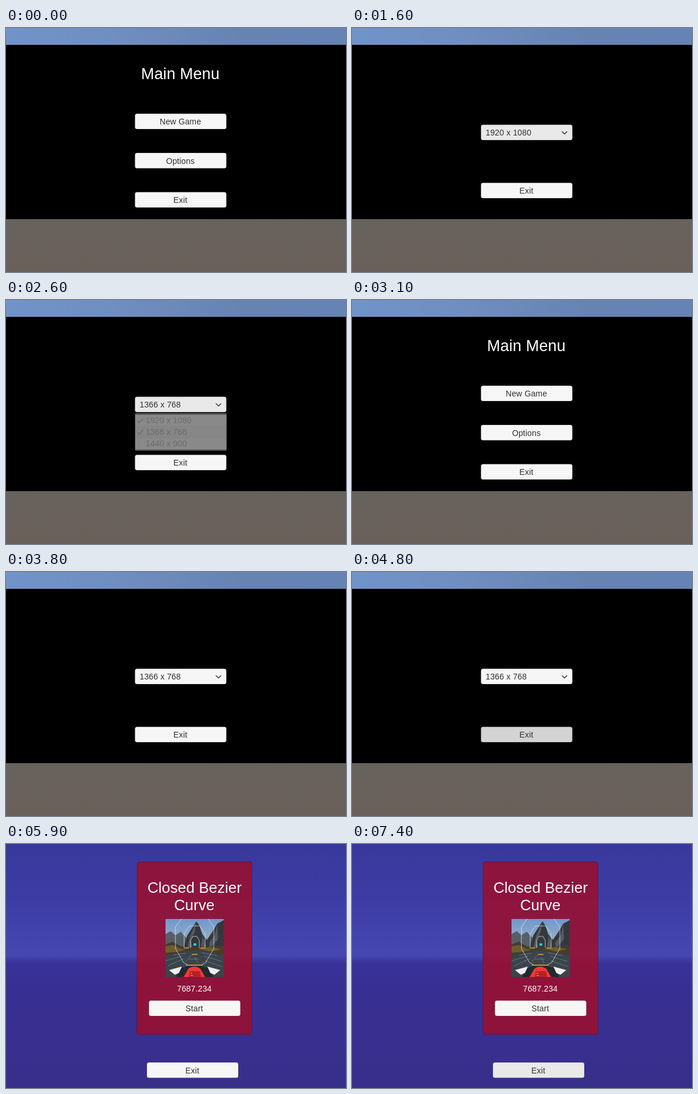
An HTML page that plays this animation: 584 by 420 pixels, repeating every 8000 ms.

```html
<!DOCTYPE html>
<html lang="en">
<head>
<meta charset="utf-8">
<title>Menu</title>
<style>
html, body { margin: 0; width: 100%; height: 100%; overflow: hidden; background: #000; }
svg { display: block; }
text { font: 14px "Liberation Sans", Arial, sans-serif; letter-spacing: .14px; fill: #323232; }
.mid { text-anchor: middle; }
.white { fill: #fff; }
.line { fill: none; stroke: #323232; stroke-width: 1.3; }
.button rect { stroke: #000; stroke-opacity: .13; }
#list > * { opacity: var(--a); }
</style>
</head>
<body>
<svg width="584" height="420" viewBox="0 0 584 420">
  <defs>
    <linearGradient id="sky">
      <stop offset="0" stop-color="#7093ca"/><stop offset=".3" stop-color="#708fc1"/>
      <stop offset=".7" stop-color="#6683b1"/><stop offset="1" stop-color="#6583b5"/>
    </linearGradient>
    <linearGradient id="ground" x2="0" y2="1">
      <stop offset="0" stop-color="#67625e"/><stop offset="1" stop-color="#6a605a"/>
    </linearGradient>
    <linearGradient id="dusk" x2="0" y2="1">
      <stop offset="0" stop-color="#38389c"/><stop offset=".22" stop-color="#3d3ca4"/>
      <stop offset=".4" stop-color="#4344ae"/><stop offset=".455" stop-color="#4647b0"/>
      <stop offset=".49" stop-color="#383298"/><stop offset=".6" stop-color="#382f93"/>
      <stop offset="1" stop-color="#382f8b"/>
    </linearGradient>
    <linearGradient id="air" x2="0" y2="1">
      <stop offset="0" stop-color="#6f98cd"/><stop offset=".5" stop-color="#a4b5c4"/>
    </linearGradient>
    <clipPath id="photo"><path d="M274 129h100v100h-100z"/></clipPath>
  </defs>

  <g id="menus">
    <path fill="url(#sky)" d="M0 0h584v29H0z"/>
    <path fill="url(#ground)" d="M0 329h584v91H0z"/>
    <g id="main">
      <text class="mid white" x="299.5" y="87.5" style="font-size:27px">Main Menu</text>
    </g>
    <g id="options">
      <g class="button">
        <rect id="drop" x="221.5" y="166.5" width="157" height="26.5" rx="3.5"/>
        <text id="value" x="229.5" y="185"></text>
        <path class="line" d="M360.5 178l4.5 4.5 4.5-4.5"/>
      </g>
      <g id="list">
        <rect x="221.5" y="194.5" width="157.5" height="65" rx="2" fill="#fff"/>
      </g>
    </g>
  </g>

  <g id="level">
    <path fill="url(#dusk)" d="M0 0h584v420H0z"/>
    <rect x="225" y="30.5" width="197.5" height="297.5" rx="4" fill="#9b0f2d" fill-opacity=".86" stroke="#4a1a50" stroke-opacity=".7"/>
    <g class="mid">
      <text class="white" x="324" y="84" style="font-size:26px;letter-spacing:0">Closed Bezier</text>
      <text class="white" x="323.5" y="114" style="font-size:26px;letter-spacing:0">Curve</text>
      <text class="white" x="323.5" y="254">7687.234</text>
    </g>
    <g clip-path="url(#photo)">
      <path fill="url(#air)" d="M274 129h100v100h-100z"/>
      <path fill="#565f68" d="M274 155l9-5 8 7 9-6 12 13 20 8 42-20v34H274z"/>
      <path fill="#33383c" d="M304 182l7-24 9-14 7-11 5 7 5 15 8 10 9-13 9-15 11-6v55H304z"/>
      <path fill="#555b60" d="M327 134l-3 18-7 13 3 12-9 4 5-22zM363 139l-5 19-9 12 1 11 14-17zM338 157l6 21-9 3z"/>
      <path fill="#443d2c" d="M274 173l12-5 14 8 18 3 56-4v54H274z"/>
      <path fill="#6d5c2e" d="M274 176l13-2 12 6 9 2-16 4-18 1zM330 181l20-4 20 4-18 4z"/>
      <path fill="#3a444c" d="M274 193l40-9h20l40 8v37H274z"/>
      <path fill="none" stroke="#78858e" stroke-opacity=".75" d="M274 201l28-8M278 210l28-13M287 191l22-3M308 203l10-11M314 198h17M330 205l-6-10M340 193l30 9M342 201l29 10M336 187l26 5"/>
      <path fill="none" stroke="#dce6ec" stroke-width=".9" stroke-opacity=".85" d="M301 129l-10 14v37l14 24 7 4M347 129l10 14v37l-14 24-7 4M306 180v-25l9-14h18l9 14v25M317 179v-13l4-7h7l4 7v13"/>
      <path fill="none" stroke="#e8a43b" stroke-width="1.5" d="M309 208.500h29M319 190h10M307 179h7M334 179h7"/>
      <path fill="#35c5c0" d="M322 171h5v4h-5z"/>
      <path fill="#222930" d="M292 229l8-15 12-4h24l12 4 8 15z"/>
      <path fill="#f3eeee" d="M280 217l22-6-5 11-7 3zM368 217l-22-6 5 11 7 3z"/>
      <path fill="#ef3832" d="M305 229l8-14q10-8 21 0l8 14z"/>
      <path fill="#b91f25" d="M316 219h17l2 10h-21z"/>
      <path stroke="#f0a09b" d="M317 222.500h3M317 226.500h4"/>
    </g>
  </g>
</svg>
<script>
const $ = id => document.getElementById(id);
const NORMAL = '#f6f6f6', HOVER = '#e9e9e9', PRESSED = '#d3d3d3';

function add(parent, tag, attrs, text = '') {
  const el = document.createElementNS('http://www.w3.org/2000/svg', tag);
  for (const k in attrs) el.setAttribute(k, attrs[k]);
  el.textContent = text;
  return parent.appendChild(el);
}

function button(parent, id, label, x, y) {
  const g = add($(parent), 'g', { class: 'button' });
  add(g, 'rect', { id, x: x + .5, y: y + .5, width: 157, height: 26.5, rx: 3.5 });
  add(g, 'text', { class: 'mid', x: x + 78.5, y: y + 19 }, label);
}

button('main', 'newGame', 'New Game', 221, 147);
button('main', 'setup', 'Options', 221, 214.5);
button('main', 'quit', 'Exit', 221, 282);
button('options', 'back', 'Exit', 221, 266);
button('level', 'start', 'Start', 245, 269);
button('level', 'leave', 'Exit', 241.5, 375.5);

const sizes = ['1920 x 1080', '1366 x 768', '1440 x 900'];
sizes.forEach((size, i) => {
  const y = 197.5 + 20 * i;
  add($('list'), 'rect', { id: 'row' + i, x: 222, y, width: 156.5, height: 20 });
  add($('list'), 'path', { id: 'check' + i, class: 'line', d: `M225.5 ${y + 10}l3.5 3.500 7-7.500` });
  add($('list'), 'text', { x: 240, y: y + 14.5 }, size);
});

const buttons = ['newGame', 'setup', 'quit', 'drop', 'back', 'start', 'leave'];
const initial = { screen: 'main', size: 0, list: 0, row1: '#fff', checked: 0 };

// Each step changes the state from its time (ms) on; a new screen resets its buttons.
const steps = [
  [900, { setup: PRESSED }],
  [1000, { screen: 'options' }],
  [1600, { drop: HOVER }],
  [1700, { drop: PRESSED }],
  [1800, { drop: HOVER, list: .5 }],
  [1900, { list: 1 }],
  [2500, { row1: '#d0d0d0' }],
  [2600, { list: .33, size: 1, checked: 1, row1: '#ececec' }],
  [2700, { list: 0 }],
  [2800, { back: HOVER }],
  [3000, { back: PRESSED }],
  [3100, { screen: 'main' }],
  [3600, { setup: HOVER }],
  [3700, { setup: PRESSED }],
  [3800, { screen: 'options' }],
  [4700, { back: HOVER }],
  [4800, { back: PRESSED }],
  [4900, { screen: 'main' }],
  [5800, { newGame: PRESSED }],
  [5900, { screen: 'level' }],
  [7200, { start: HOVER }],
  [7300, { start: NORMAL }],
  [7400, { leave: HOVER }],
];

function stateAt(t) {
  let s = { ...initial };
  for (const [time, change] of steps) {
    if (time > t) break;
    if (change.screen) for (const id of buttons) delete s[id];
    Object.assign(s, change);
  }
  return s;
}

const show = (id, on) => $(id).style.display = on ? '' : 'none';

function draw(now) {
  const s = stateAt(now % 8000);
  show('menus', s.screen !== 'level');
  for (const id of ['main', 'options', 'level']) show(id, s.screen === id);
  for (const id of buttons) $(id).style.fill = s[id] || NORMAL;
  $('value').textContent = sizes[s.size];
  show('list', s.list > 0);
  $('list').style.setProperty('--a', s.list);
  sizes.forEach((_, i) => {
    $('row' + i).style.fill = i === 1 ? s.row1 : '#f5f5f5';
    show('check' + i, i <= s.checked);
  });
  requestAnimationFrame(draw);
}
draw(performance.now());
</script>
</body>
</html>
```
